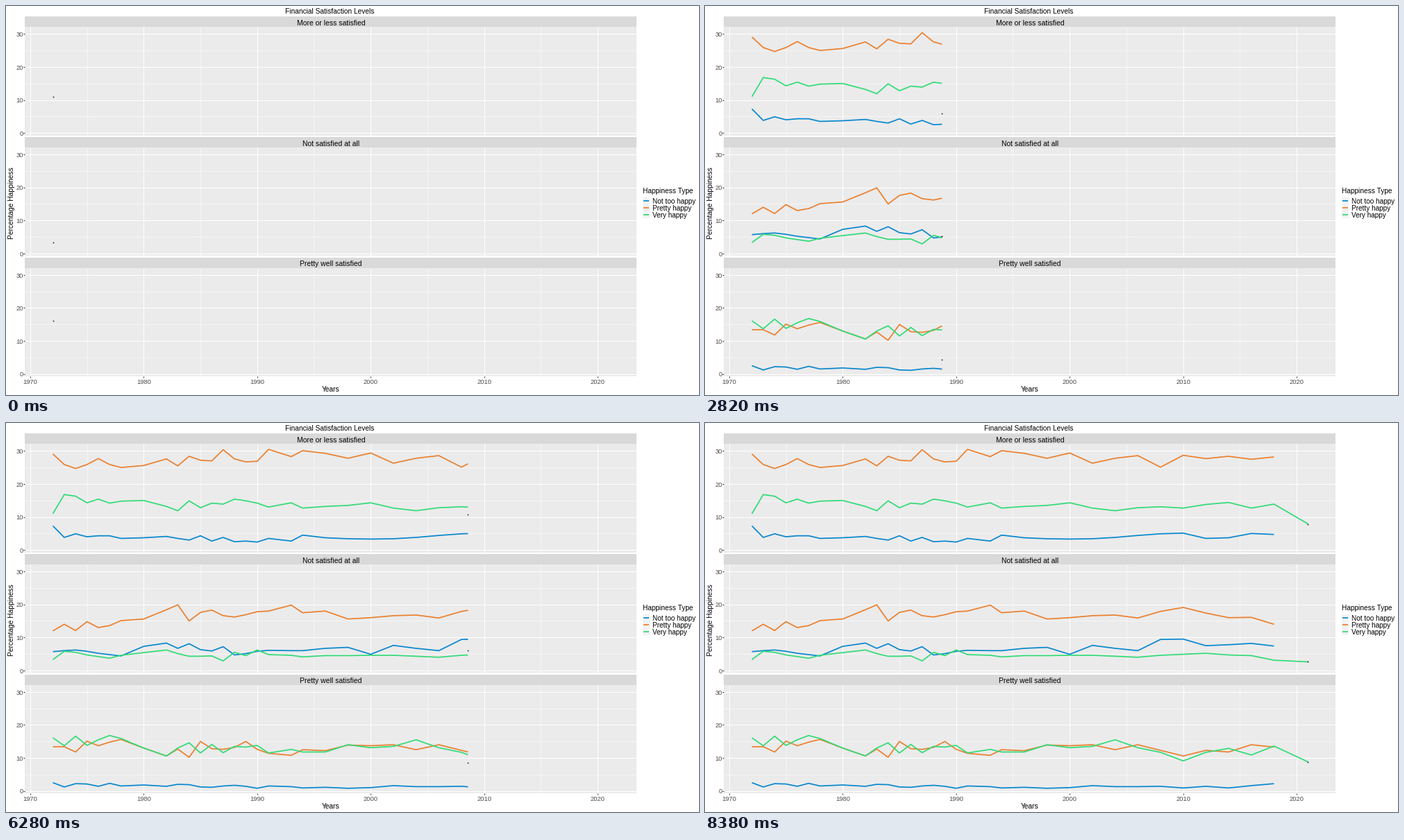
Write a matplotlib script that moves like this. It is 998 px wide and 561 px high and loops after 8.4 s.

```python
import numpy as np
import matplotlib.pyplot as plt
from matplotlib.animation import FuncAnimation
from matplotlib.patches import Rectangle

W, H, DPI = 998, 561, 100
PX = 72 / DPI                      # points per pixel
STEPS, TICKS, TICK_MS = 180, 420, 20

plt.rcParams["font.family"] = "Liberation Sans"

BLUE, ORANGE, GREEN = COLORS = "#0a88ce", "#ea8130", "#33db78"
LEVELS = "Not too happy", "Pretty happy", "Very happy"

YEARS = np.array([*range(1972, 1979), 1980, *range(1982, 1992), 1993, 1994,
                  *range(1996, 2019, 2), 2021])
# Each survey lands on a whole step; motion is linear in between.
KEYS = np.rint((STEPS - 1) * (YEARS - 1972) / 49)

LEFT, RIGHT = 27.5, 908.5
TOP, PANEL_H, STRIP_H, PITCH = 30.4, 156.2, 15, 173.75
UNIT = 4.757

fig = plt.figure(figsize=(W / DPI, H / DPI), dpi=DPI, facecolor="white")
ax = fig.add_axes([0, 0, 1, 1])
ax.set(xlim=(0, W), ylim=(H, 0))
ax.axis("off")


def x_px(year):
    return LEFT + (year - 1969.55) * (RIGHT - LEFT) / 53.9


def y_px(value, row):
    return TOP + row * PITCH + 152.7 - np.asarray(value) * UNIT


def box(x, y, w, h, color):
    ax.add_patch(Rectangle((x, y), w, h, fc=color, lw=0, zorder=0))


def label(x, y, text, size=10.3, ha="center", color="black", **kw):
    ax.text(x, y, text, fontsize=size * PX, ha=ha, va="baseline", color=color, **kw)


def grid(years, values, row, width):
    top = TOP + row * PITCH
    style = dict(colors="white", lw=width * PX, zorder=1)
    ax.hlines(y_px(values, row), LEFT, RIGHT, **style)
    ax.vlines(x_px(years), top, top + PANEL_H, **style)


panels = []


def add_panel(title, low, mid, high):
    row = len(panels)
    top = TOP + row * PITCH
    box(LEFT, top - STRIP_H, RIGHT - LEFT, STRIP_H, "#d9d9d9")
    box(LEFT, top, RIGHT - LEFT, PANEL_H, "#ebebeb")
    label((LEFT + RIGHT) / 2, top - 2.6, title, 10.4)

    grid(np.arange(1975, 2020, 10), [5, 15, 25], row, 0.55)
    grid(np.arange(1970, 2021, 10), [0, 10, 20, 30], row, 1.05)
    for v in (0, 10, 20, 30):
        label(25.2, y_px(v, row) + 3.7, str(v), 9.4, "right", "#4d4d4d")
    ax.hlines(y_px([0, 10, 20, 30], row), LEFT - 2.4, LEFT, colors="#333333", lw=PX)

    lines = [ax.plot([], [], color=c, lw=1.75 * PX, solid_capstyle="butt",
                     solid_joinstyle="round", zorder=3 + i)[0]
             for i, c in enumerate(COLORS)]
    dot, = ax.plot([], [], "o", color="black", ms=1.7 * PX, mew=0, zorder=7)
    panels.append((row, [np.array(s) for s in (low, mid, high)], lines, dot))


add_panel(
    "More or less satisfied",
    [7.3, 3.8, 4.9, 4.0, 4.3, 4.3, 3.5, 3.7, 4.1, 3.5, 3.0, 4.3, 2.7, 3.8, 2.5, 2.7, 2.4,
     3.5, 2.7, 4.5, 3.7, 3.4, 3.3, 3.4, 3.8, 4.4, 4.9, 5.1, 3.5, 3.7, 5.0, 4.7, 9.4],
    [29.1, 25.9, 24.7, 25.9, 27.7, 25.9, 25.0, 25.6, 27.6, 25.5, 28.4, 27.2, 27.0, 30.4,
     27.6, 26.7, 26.9, 30.5, 28.3, 30.1, 29.3, 27.8, 29.4, 26.3, 27.8, 28.6, 25.1, 28.7,
     27.7, 28.4, 27.5, 28.2, 29.4],
    [11.0, 16.8, 16.3, 14.3, 15.4, 14.2, 14.8, 15.0, 13.2, 11.9, 14.9, 12.8, 14.2, 13.9,
     15.4, 14.9, 14.2, 13.0, 14.3, 12.7, 13.2, 13.5, 14.3, 12.7, 11.9, 12.8, 13.1, 12.7,
     13.8, 14.4, 12.7, 13.9, 7.9])
add_panel(
    "Not satisfied at all",
    [5.7, 6.0, 6.2, 5.8, 5.2, 4.8, 4.4, 7.3, 8.3, 6.7, 8.1, 6.3, 5.9, 7.2, 4.7, 5.1, 5.8,
     6.1, 6.0, 6.0, 6.7, 7.0, 4.9, 7.6, 6.7, 6.0, 9.4, 9.5, 7.5, 7.8, 8.2, 7.4, 8.9],
    [12.0, 14.0, 12.1, 14.8, 13.0, 13.6, 15.1, 15.6, 18.4, 19.9, 15.0, 17.6, 18.3, 16.6,
     16.2, 16.9, 17.8, 18.0, 19.8, 17.5, 18.0, 15.6, 16.0, 16.6, 16.8, 15.9, 17.9, 19.1,
     17.4, 16.0, 16.1, 14.0, 12.5],
    [3.3, 5.8, 5.5, 4.7, 4.2, 3.7, 4.6, 5.4, 6.2, 5.1, 4.3, 4.3, 4.4, 2.9, 5.5, 4.5, 6.2,
     4.8, 4.6, 4.1, 4.5, 4.5, 4.6, 4.6, 4.3, 4.0, 4.6, 4.9, 5.2, 4.7, 4.5, 3.1, 2.6])
add_panel(
    "Pretty well satisfied",
    [2.5, 1.2, 2.2, 2.1, 1.4, 2.3, 1.5, 1.8, 1.4, 2.0, 1.9, 1.2, 1.1, 1.5, 1.7, 1.4, 0.8,
     1.5, 1.3, 0.9, 1.1, 0.8, 1.0, 1.6, 1.3, 1.3, 1.4, 0.9, 1.4, 0.9, 1.6, 2.2, 4.4],
    [13.4, 13.4, 11.8, 15.1, 13.7, 14.8, 15.6, 13.0, 10.6, 12.7, 10.2, 15.0, 12.8, 12.6,
     13.2, 15.0, 12.6, 11.4, 10.8, 12.5, 12.2, 13.9, 13.7, 14.0, 12.5, 14.0, 12.3, 10.6,
     12.3, 11.8, 14.0, 13.3, 16.0],
    [16.1, 13.7, 16.6, 13.8, 15.5, 16.8, 15.9, 13.0, 10.6, 13.0, 14.6, 11.5, 14.1, 11.6,
     13.5, 13.3, 13.8, 11.5, 12.6, 11.8, 11.8, 14.0, 13.1, 13.5, 15.5, 13.1, 11.7, 9.1,
     11.7, 12.9, 10.9, 13.6, 8.8])

# Titles, time axis and legend
label(466.3, 11.4, "Financial Satisfaction Levels", 10.15)
label(467.5, 556, "Years")
label(11.3, 284, "Percentage Happiness", rotation=90, rotation_mode="anchor")
bottom = TOP + 2 * PITCH + PANEL_H
for year in range(1970, 2021, 10):
    label(x_px(year), 544.6, str(year), 9.4, color="#4d4d4d")
ax.vlines(x_px(np.arange(1970, 2021, 10)), bottom, bottom + 2.4, colors="#333333", lw=PX)

label(917, 269.6, "Happiness Type", 10.15, "left")
for i, (name, color) in enumerate(zip(LEVELS, COLORS)):
    y = 281 + 9.9 * i
    box(917, y - 4.95, 9.9, 9.9, "#f2f2f2")
    ax.plot([918, 925.8], [y, y], color=color, lw=1.75 * PX, solid_capstyle="butt")
    label(931.3, y + 3.7, name, 9.95, "left")


def step_at(tick):
    """Steps last 20, 100 and 20 ms in turn."""
    cycle, r = divmod(tick, 7)
    return 3 * cycle + (r >= 1) + (r >= 6)


def update(tick):
    step = step_at(tick)
    last = step == STEPS - 1
    done = np.searchsorted(KEYS, step, side="right")
    x_tip = x_px(np.interp(step, KEYS, YEARS))
    for row, series, lines, dot in panels:
        for i, (vals, line) in enumerate(zip(series, lines)):
            n = done - 1 if last and i < 2 else done
            xs, ys = x_px(YEARS[:n]), vals[:n]
            if not last:
                xs = np.append(xs, x_tip)
                ys = np.append(ys, np.interp(step, KEYS, vals))
            # nothing to stroke until the line has length
            line.set_data((xs, y_px(ys, row)) if step else ([], []))

        # the dot leaves the high series and heads for the next low value
        low, _, high = series
        value = high[done - 1]
        if done < len(KEYS):
            f = (step - KEYS[done - 1]) / (KEYS[done] - KEYS[done - 1])
            value += f * (low[done] - value)
        dot.set_data([x_tip], [y_px(value, row)])
    return [a for p in panels for a in (*p[2], p[3])]


anim = FuncAnimation(fig, update, frames=TICKS, interval=TICK_MS,
                     repeat=True, repeat_delay=0, blit=False)
plt.show()
```
